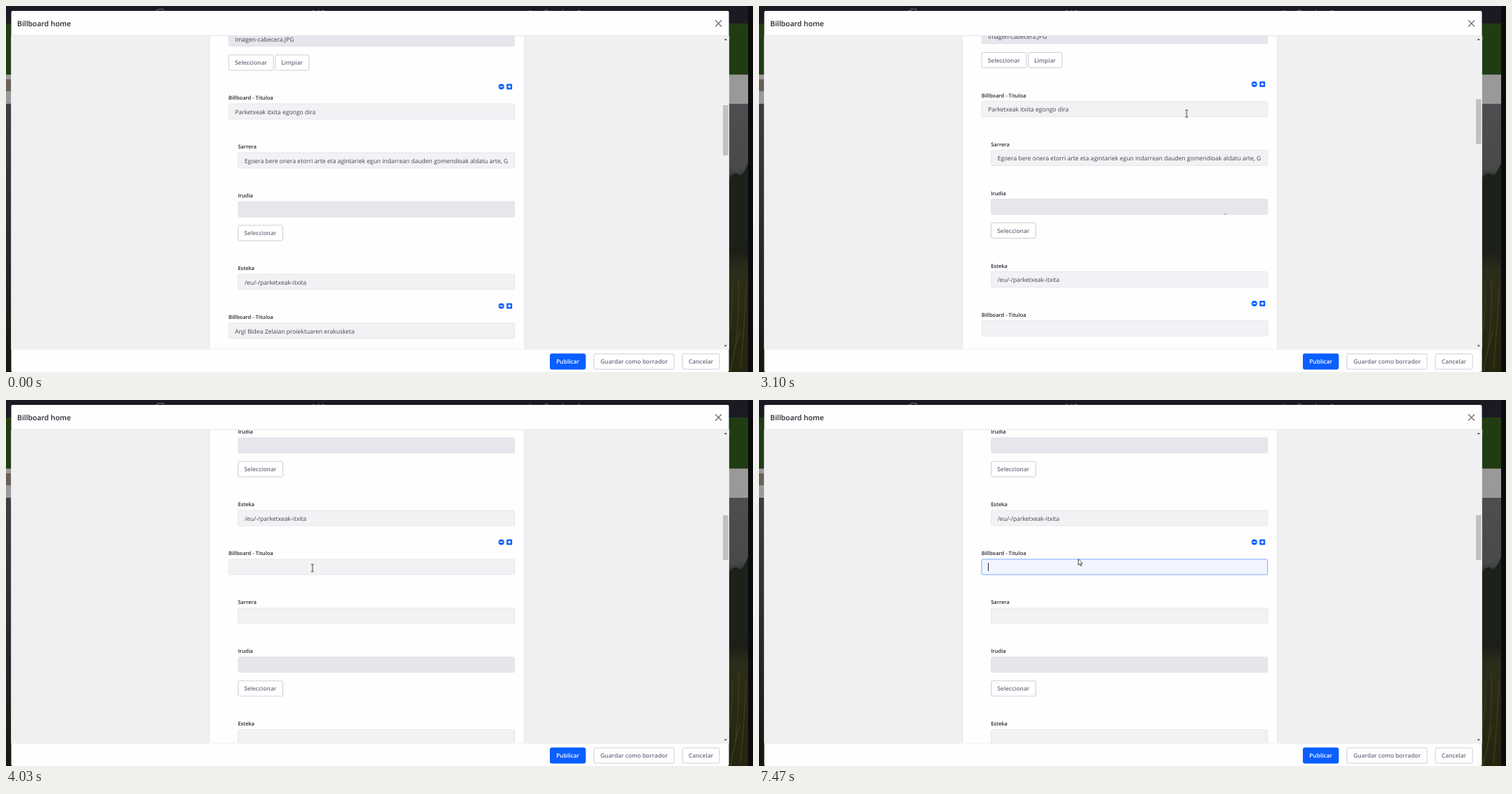
These frames come from a looping animation (1070 px wide and 524 px high, 8 s). An HTML page:

```html
<!DOCTYPE html>
<html lang="es">
<head>
<meta charset="utf-8">
<title>Billboard home</title>
<style>
html, body { margin: 0; width: 100%; height: 100%; overflow: hidden; background: #0b0b0d; }
svg { display: block; width: 1070px; height: 524px; }
text { font: 8.57px "Open Sans", "Noto Sans", sans-serif; fill: #43444f; text-rendering: geometricPrecision; white-space: pre; }
.title { font-size: 10.45px; font-weight: 600; fill: #272833; }
.label { font-size: 7.5px; font-weight: 600; fill: #272833; }
.btn text { font-size: 8.4px; font-weight: 600; fill: #6b6c7e; text-anchor: middle; }
.btn rect { fill: #fff; stroke: #cdced9; }
.btn.primary rect { fill: #0b5fff; stroke: #0b5fff; }
.btn.primary text { fill: #fff; }
.field { fill: #f1f2f4; stroke: #e7e7ec; }
.locked { fill: #e6e6ec; stroke: #e3e3ea; }
.blue { fill: #0b5fff; }
.sign { stroke: #fff; stroke-width: 1.3; fill: none; }

.scroll, .thumb-move, .old-title, .long, .short, .hover, .ring, .speck, .focus, .caret,
.arrow, .hand, .beam { animation: 8s step-end infinite; }

.scroll { animation-name: scroll; }
@keyframes scroll {
  0% { transform: translateY(0); }
  38.75% { transform: translateY(-3.5px); }
  42.625% { transform: translateY(-170px); }
  50.375%, 100% { transform: translateY(-226px); }
}
.thumb-move { animation-name: thumb; }
@keyframes thumb {
  0% { transform: translateY(0); }
  38.75% { transform: translateY(.4px); }
  42.625% { transform: translateY(24px); }
  50.375%, 100% { transform: translateY(32px); }
}
.old-title, .long { animation-name: before; }
@keyframes before { 0% { visibility: visible; } 31.125%, 100% { visibility: hidden; } }
.short { animation-name: after; }
@keyframes after { 0% { visibility: hidden; } 31.125%, 100% { visibility: visible; } }
.hover { animation-name: hover; }
@keyframes hover { 0% { visibility: hidden; } 23.25% { visibility: visible; } 38.75%, 100% { visibility: hidden; } }
.ring { animation-name: ring; }
@keyframes ring { 0% { visibility: hidden; } 27.25% { visibility: visible; } 31.125%, 100% { visibility: hidden; } }
.speck { animation-name: speck; }
@keyframes speck { 0% { visibility: hidden; } 38.75% { visibility: visible; } 42.625%, 100% { visibility: hidden; } }
.focus { animation-name: focus; }
@keyframes focus { 0% { visibility: hidden; } 54.375%, 100% { visibility: visible; } }
.caret { animation-name: caret; }
@keyframes caret {
  0%, 62.25%, 74.125%, 89.375% { visibility: hidden; }
  54.375%, 66.25%, 81.75%, 93.375%, 100% { visibility: visible; }
}

.arrow { animation-name: arrow; }
@keyframes arrow {
  0% { visibility: hidden; transform: translate(857px, 353px); }
  7.625% { visibility: visible; transform: translate(857px, 353px); }
  11.625% { visibility: visible; transform: translate(734px, 175px); }
  15.625% { visibility: visible; transform: translate(728px, 115px); }
  19.5% { visibility: visible; transform: translate(726px, 113px); }
  23.25% { visibility: hidden; transform: translate(457px, 227px); }
  58.375%, 100% { visibility: visible; transform: translate(457px, 227px); }
}
.hand { animation-name: hover; }
.beam { animation-name: beam; }
@keyframes beam {
  0% { visibility: hidden; transform: translate(612.5px, 154px); }
  38.75% { visibility: visible; transform: translate(612.5px, 154px); }
  42.625% { visibility: visible; transform: translate(451px, 231.5px); }
  50.375% { visibility: visible; transform: translate(439px, 240.5px); }
  58.375%, 100% { visibility: hidden; transform: translate(439px, 240.5px); }
}
</style>
</head>
<body>
<svg viewBox="0 0 1070 524">
  <defs>
    <clipPath id="body"><rect x="292" y="43" width="450" height="448"/></clipPath>
    <clipPath id="input"><rect x="341" y="210" width="378" height="22"/></clipPath>
    <linearGradient id="photo" x2="0" y2="1">
      <stop offset="0" stop-color="#4c4e50"/>
      <stop offset=".24" stop-color="#484a4a"/>
      <stop offset=".3" stop-color="#22261f"/>
      <stop offset=".55" stop-color="#1b1f17"/>
      <stop offset=".62" stop-color="#2c2d1a"/>
      <stop offset="1" stop-color="#24240f"/>
    </linearGradient>
    <linearGradient id="photoLeft" x2="0" y2="1">
      <stop offset="0" stop-color="#3c3e40"/>
      <stop offset=".45" stop-color="#2b2e2f"/>
      <stop offset="1" stop-color="#14170f"/>
    </linearGradient>
    <g id="select" class="btn">
      <rect x="332.5" y="314" width="64" height="22" rx="2"/>
      <text x="364.3" y="328">Seleccionar</text>
    </g>
    <g id="block">
      <circle class="blue" cx="709.5" cy="115.5" r="4"/>
      <path class="sign" d="M707.2 115.5h4.6"/>
      <rect class="blue" x="717" y="111.5" width="8" height="8" rx="1.2"/>
      <path class="sign" d="M718.7 115.5h4.6M721 113.2v4.6"/>
      <text class="label" x="318.7" y="134.3">Billboard - Tituloa</text>
      <rect class="field" x="319" y="140" width="409.500" height="22" rx="2"/>
      <text class="label" x="332.200" y="204.300">Sarrera</text>
      <rect class="field" x="332.500" y="210" width="396" height="22" rx="2"/>
      <text class="label" x="332.200" y="274.300">Irudia</text>
      <rect class="locked" x="332.500" y="280" width="396" height="22" rx="2"/>
      <use href="#select"/>
      <text class="label" x="332.200" y="378.300">Esteka</text>
      <rect class="field" x="332.500" y="384" width="396" height="22" rx="2"/>
    </g>
  </defs>

  <!-- dimmed page -->
  <rect width="1063" height="25" fill="#1b1a23"/>
  <g fill="none" stroke="#6d6c75">
    <path d="M217.500 8V4.500h8V8M214 6.500h2M439 6.500h3M447 6h2M452 6.500h4M749 7h4M770 8q4-5 8 0M797.500 5v3M818 8q3-4 6 0"/>
  </g>
  <rect y="25" width="1063" height="73" fill="#213c12"/>
  <text x="1033" y="48.500" style="fill:#8d9a86">E</text>
  <rect y="98" width="1063" height="42" fill="#999"/>
  <path d="M0 98.500H1063" stroke="#6a7263" stroke-dasharray="1 1"/>
  <rect y="105" width="7" height="17" fill="#6a5f59"/>
  <rect y="140" width="8" height="384" fill="url(#photoLeft)"/>
  <rect x="1035" y="140" width="28" height="384" fill="url(#photo)"/>
  <path d="M1035 248q8-12 14-7t14-17v116q-14 8-28 0z" fill="#1c2119"/>
  <path d="M1036 470q6-40 4-70M1043 500q8-50 6-110M1052 520q6-60 8-120M1038 524q4-30 14-60" fill="none" stroke="#3b3a1c" stroke-width="1.500"/>

  <!-- dialog -->
  <rect x="7.500" y="7" width="1028" height="517" rx="2" fill="#fefefe"/>
  <rect x="7.500" y="42" width="1028" height="449.500" fill="#e6e6eb"/>
  <rect x="7.500" y="43" width="1028" height="448" fill="#f0f0f2"/>
  <rect x="291" y="43" width="452" height="448" fill="#e7e7ec"/>
  <rect x="292" y="43" width="450" height="448" fill="#fefefe"/>
  <text class="title" x="16" y="29.200">Billboard home</text>
  <path d="M1016 20.500l9 9m0-9l-9 9" stroke="#62636f" stroke-width="1.100"/>

  <g clip-path="url(#body)">
    <g class="scroll">
      <rect class="locked" x="319" y="36" width="409.500" height="21.500" rx="2"/>
      <text x="328" y="50.800">Imagen-cabecera.JPG</text>
      <use href="#select" x="-13.500" y="-244"/>
      <g class="btn">
        <rect x="386" y="70" width="48" height="22" rx="2"/>
        <text x="409.700" y="84">Limpiar</text>
      </g>
      <use href="#block"/>
      <use href="#block" y="314"/>
      <g class="ring">
        <rect x="716" y="109" width="12" height="12" rx="2" fill="none" stroke="#80acff" stroke-width="2"/>
      </g>
      <g class="hover">
        <rect x="717" y="111.500" width="8" height="8" rx="1.200" fill="#004ad7"/>
        <path class="sign" d="M718.700 115.500h4.600M721 113.200v4.600"/>
      </g>
      <text x="328" y="154.800">Parketxeak itxita egongo dira</text>
      <g clip-path="url(#input)">
        <text x="341.700" y="224.800">Egoera bere onera etorri arte eta agintariek egun indarrean dauden gomendioak aldatu arte, G</text>
      </g>
      <text x="341.700" y="398.800">/eu/-/parketxeak-itxita</text>
      <text class="old-title" x="328" y="468.800">Argi Bidea Zelaian proiektuaren erakusketa</text>
      <rect class="focus" x="319" y="454" width="409.500" height="22" rx="2" fill="#f0f5ff" stroke="#80acff"/>
      <rect class="caret" x="328" y="459" width="1" height="12" fill="#272833"/>
    </g>
    <path class="speck" d="M665.500 297.500q2.500 2.500 5 0" fill="none" stroke="#e58a8f"/>
  </g>

  <!-- scrollbar -->
  <rect x="1027" y="43" width="8" height="448" fill="#f1f1f1"/>
  <path d="M1028.500 49l2.200-2.500 2.200 2.500zM1028.500 485.500h4.400l-2.200 2.500z" fill="#505050"/>
  <g fill="#c1c1c1">
    <rect class="long" x="1027" y="142" width="7.500" height="72"/>
    <g class="thumb-move"><rect class="short" x="1027" y="133" width="7.500" height="64"/></g>
  </g>

  <!-- footer -->
  <g class="btn primary">
    <rect x="779.500" y="498" width="50.500" height="22" rx="2"/>
    <text x="804.700" y="512">Publicar</text>
  </g>
  <g class="btn">
    <rect x="842" y="498" width="115" height="22" rx="2"/>
    <text x="899.700" y="512">Guardar como borrador</text>
    <rect x="969" y="498" width="53" height="22" rx="2"/>
    <text x="995.500" y="512">Cancelar</text>
  </g>

  <!-- pointers -->
  <path class="arrow" d="M.4.600V9.300L2.300 7.500 3.700 10.600 5.100 10 3.800 7H6.500Z" fill="#fff" stroke="#222" stroke-width=".8"/>
  <g class="hand">
    <path transform="translate(718.300 115)" d="M2.600 1.200Q2.600.4 3.400.4T4.200 1.200V5Q5.600 4.400 5.900 5.400 7.200 4.800 7.400 5.800 8.700 5.500 8.700 6.800V9Q8.700 11 7.600 12.800H3.400Q2.500 10.500.5 8.200.3 7 1.400 7.100L2.600 8.200Z" fill="#fff" stroke="#222" stroke-width=".8"/>
  </g>
  <path class="beam" d="M-2-5H2M-2 5H2M0-5V5" fill="none" stroke="#444"/>
</svg>
</body>
</html>
```
